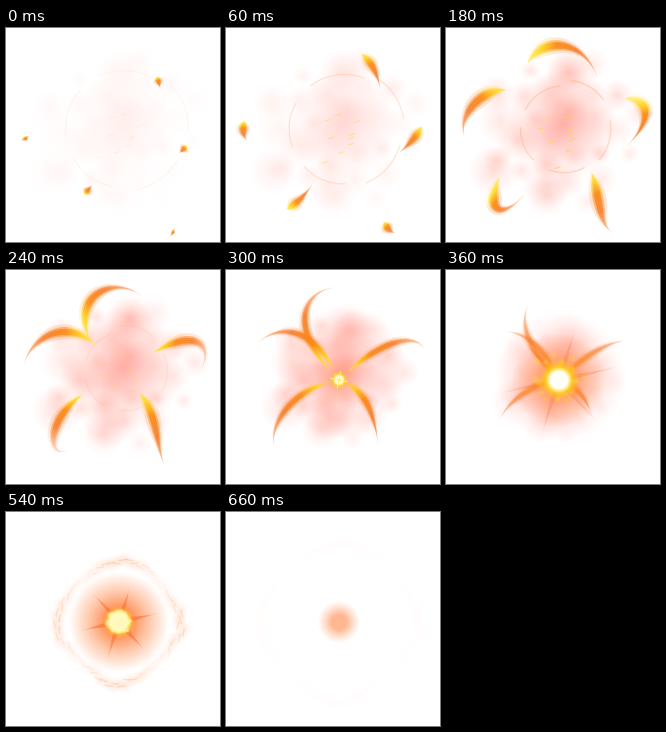
Recreate the animation shown at these times as an HTML page with a canvas. Size 214 px wide and 214 px high, loop 690 ms.

```html
<!DOCTYPE html>
<html lang="en">
<head>
<meta charset="utf-8">
<title>Converging flames</title>
<style>
html, body { margin: 0; width: 100%; height: 100%; overflow: hidden; background: #fff; }
canvas { display: block; width: 214px; height: 214px; }
</style>
</head>
<body>
<canvas id="stage" width="214" height="214"></canvas>
<script>
const ctx = document.getElementById('stage').getContext('2d');
const SIZE = 214, LOOP = 690, STEP = 30, CX = 113, CY = 110;
const TAU = Math.PI * 2, GOLDEN = 2.39996;

// Start and two Bezier handles; every flame ends at the centre.
const flames = [
  { from: [154, 60], out: [140, -20], into: [22, 22] },
  { from: [21, 113], out: [0, 85], into: [70, 15] },
  { from: [86, 157], out: [34, 228], into: [27, 125] },
  { from: [173, 125], out: [230, 78], into: [187, 38] },
  { from: [169, 205], out: [143, 198], into: [163, 126] }
];
const puffs = [[47, 143], [101, 156], [125, 45]];

const mix = (a, b, k) => a + (b - a) * k;

function ramp(t, from, to) {
  const k = Math.max(0, Math.min(1, (t - from) / (to - from)));
  return k * k * (3 - 2 * k);
}

const pulse = (t, rise, full, fall, end) => ramp(t, rise, full) * (1 - ramp(t, fall, end));

function random(seed) {
  const v = Math.sin(seed * 127.1 + 31.7) * 43758.5453;
  return v - Math.floor(v);
}

const polar = (r, angle, x = CX, y = CY) => [x + r * Math.cos(angle), y + r * Math.sin(angle)];

function glow(x, y, r, rgb, alpha, solid = 0) {
  if (alpha <= 0 || r <= 0) return;
  const g = ctx.createRadialGradient(x, y, 0, x, y, r);
  g.addColorStop(0, `rgba(${rgb},${alpha})`);
  g.addColorStop(solid, `rgba(${rgb},${alpha})`);
  g.addColorStop(mix(solid, 1, .5), `rgba(${rgb},${alpha * .45})`);
  g.addColorStop(1, `rgba(${rgb},0)`);
  ctx.fillStyle = g;
  ctx.fillRect(x - r, y - r, r * 2, r * 2);
}

function trace(points) {
  ctx.beginPath();
  points.forEach(p => ctx.lineTo(...p));
}

function pointOn({ from, out, into }, u) {
  const v = 1 - u;
  return [CX, CY].map((end, n) =>
    v * v * v * from[n] + 3 * v * v * u * out[n] + 3 * v * u * u * into[n] + u * u * u * end);
}

// Tapered band, widest about two thirds of the way to the head.
function ribbon(points, width) {
  const left = [], right = [], last = points.length - 1;
  points.forEach(([x, y], i) => {
    const p = points[Math.max(0, i - 1)], q = points[Math.min(last, i + 1)];
    const dx = q[0] - p[0], dy = q[1] - p[1], len = Math.hypot(dx, dy) || 1;
    const s = i / last, w = width * 2.8 * Math.pow(s, 1.8) * (1 - s);
    left.push([x - dy / len * w, y + dx / len * w]);
    right.unshift([x + dy / len * w, y - dx / len * w]);
  });
  trace(left.concat(right));
  ctx.fill();
}

const travel = t => ramp(t, -55, 345);

function drawFlame(curve, t) {
  const head = travel(t), tail = travel(t - 180), alpha = 1 - ramp(t, 310, 430);
  if (head - tail < .02 || !alpha) return;
  const points = Array.from({ length: 41 }, (_, i) => pointOn(curve, mix(tail, head, i / 40)));
  const width = mix(6, 10, ramp(t, 0, 120)) * mix(1, .65, ramp(t, 180, 330));
  const heat = ctx.createLinearGradient(...points[0], ...points[40]);
  heat.addColorStop(0, 'rgba(255,140,70,.25)');
  heat.addColorStop(.35, 'rgba(246,122,36,.85)');
  heat.addColorStop(.65, '#fb8a16');
  heat.addColorStop(.84, '#ffd020');
  heat.addColorStop(1, 'rgba(255,232,80,.55)');
  ctx.fillStyle = ctx.strokeStyle = heat;
  ctx.lineWidth = 1;
  ctx.globalAlpha = alpha * .2;
  ribbon(points, width * 1.9);
  ctx.globalAlpha = alpha * .5;
  trace(points);
  ctx.stroke();
  ribbon(points, width * 1.2);
  ctx.globalAlpha = alpha * .85;
  ribbon(points, width * .75);
  ctx.globalAlpha = 1;
}

function drawClouds(t) {
  const alpha = mix(.2, 1, ramp(t, 0, 150)) * (1 - ramp(t, 300, 450));
  if (!alpha) return;
  const gather = ramp(t, 180, 450), spread = mix(1, .55, gather);
  const x = mix(117, CX, gather), y = mix(97, CY, gather);
  glow(x, y, mix(54, 66, ramp(t, 150, 300)), '255,105,88', .5 * alpha);
  for (let i = 1; i <= 26; i++) {
    const r = 78 * Math.sqrt(i / 26) * spread;
    const [bx, by] = polar(r, i * GOLDEN + t / 900, x, y + 6);
    glow(bx, by, 9 + random(i) * 17, '255,110,85', (.1 + random(i + 60) * .17) * alpha);
  }
  for (const [px, py] of puffs) {
    glow(mix(CX, px, spread), mix(CY, py, spread), 25, '255,112,98', .22 * alpha);
  }
}

function drawWisps(t) {
  const alpha = pulse(t, -60, 130, 180, 290);
  if (!alpha) return;
  const turn = -t / 260, r = mix(58, 38, ramp(t, -30, 270));
  ctx.lineWidth = 1.3;
  for (let i = 0; i < 5; i++) {
    const start = turn - 2 + i * TAU / 5;
    ctx.strokeStyle = `rgba(255,165,105,${alpha * .38})`;
    ctx.beginPath();
    ctx.arc(CX + 5, CY - 9, r + random(i) * 7, start, start + .6 + random(i + 9) * .6);
    ctx.stroke();
  }
  ctx.strokeStyle = `rgba(255,212,80,${alpha * .65})`;
  for (let i = 0; i < 9; i++) {
    const [x, y] = polar(7 + random(i) * 24, i * GOLDEN + turn);
    ctx.beginPath();
    ctx.moveTo(x, y);
    ctx.lineTo(x + 6, y - 2);
    ctx.stroke();
  }
}

function drawRays(t) {
  const alpha = pulse(t, 320, 400, 530, 640) * .6;
  if (!alpha) return;
  const length = mix(60, 40, ramp(t, 390, 560));
  for (let i = 0; i < 6; i++) {
    const angle = -1.27 + i * TAU / 6;
    const tip = polar(length * (.9 + random(i + 8) * .2), angle);
    const fade = ctx.createLinearGradient(CX, CY, ...tip);
    fade.addColorStop(0, `rgba(250,95,20,${alpha})`);
    fade.addColorStop(.65, `rgba(250,105,45,${alpha * .8})`);
    fade.addColorStop(1, 'rgba(255,125,60,.05)');
    ctx.fillStyle = fade;
    ctx.beginPath();
    ctx.moveTo(...polar(12, angle - .22));
    ctx.quadraticCurveTo(...polar(length * .5, angle - .02), ...tip);
    ctx.quadraticCurveTo(...polar(length * .5, angle + .07), ...polar(12, angle + .22));
    ctx.fill();
  }
}

// Four ragged petals that drift outwards.
function drawRing(t) {
  const alpha = pulse(t, 350, 420, 510, 690);
  if (!alpha) return;
  const radius = mix(32, 80, (t - 330) / 330), count = 64;
  ctx.lineWidth = 1.2;
  for (let i = 0; i < count; i++) {
    const angle = i * TAU / count, lobe = Math.cos(angle * 2) ** 2;
    const r = radius * (.88 + .12 * lobe) + (random(i) - .5) * 7;
    const strength = alpha * (.25 + .75 * lobe);
    glow(...polar(r, angle), 8, '255,150,95', strength * .2);
    ctx.strokeStyle = `rgba(255,150,80,${strength * .3})`;
    ctx.beginPath();
    ctx.moveTo(...polar(r, angle));
    ctx.lineTo(...polar(r + random(i + 70) * 5 - 2, angle + .13));
    ctx.stroke();
  }
}

function drawCore(t) {
  const swell = ramp(t, 240, 420), settle = ramp(t, 420, 540), fade = ramp(t, 480, 660);
  const burn = ramp(t, 240, 390) * mix(.92, .52, ramp(t, 540, 660));
  glow(CX, CY, mix(mix(12, 60, swell), 21, fade), '255,118,44', burn, mix(.1, .35, fade));
  drawRays(t);
  glow(CX, CY, mix(mix(3, 27, swell), 16, settle), '255,214,30', pulse(t, 240, 300, 540, 620), .55);

  const sparks = pulse(t, 320, 400, 530, 600) * .85;
  const cream = mix(30, 165, settle);
  for (let i = 0; i < 16; i++) {
    const r = mix(17 + random(i + 20) * 12, 8 + random(i) * 4, settle);
    glow(...polar(r, i * TAU / 16 + random(i) * .4), 2 + random(i + 45) * 3,
      `255,${mix(216, 242, settle)},${cream}`, sparks, .3);
  }
  glow(CX, CY, mix(mix(2, 17, swell), 13, settle), `255,${mix(255, 249, settle)},${mix(250, 188, settle)}`,
    pulse(t, 240, 290, 540, 600), .65);

  ctx.strokeStyle = `rgba(255,240,120,${pulse(t, 240, 290, 310, 360)})`;
  ctx.lineWidth = 1;
  ctx.beginPath();
  for (let i = 0; i < 8; i++) {
    ctx.moveTo(CX, CY);
    ctx.lineTo(...polar(i % 2 ? 6 : 9, i * TAU / 8 + .2));
  }
  ctx.stroke();
}

function draw(t) {
  ctx.fillStyle = '#fff';
  ctx.fillRect(0, 0, SIZE, SIZE);
  drawClouds(t);
  drawWisps(t);
  drawRing(t);
  flames.forEach(curve => drawFlame(curve, t));
  drawCore(t);
}

const start = performance.now();
function tick() {
  const elapsed = (performance.now() - start) % LOOP;
  draw(Math.floor(elapsed / STEP) * STEP);
  requestAnimationFrame(tick);
}
tick();
</script>
</body>
</html>
```
